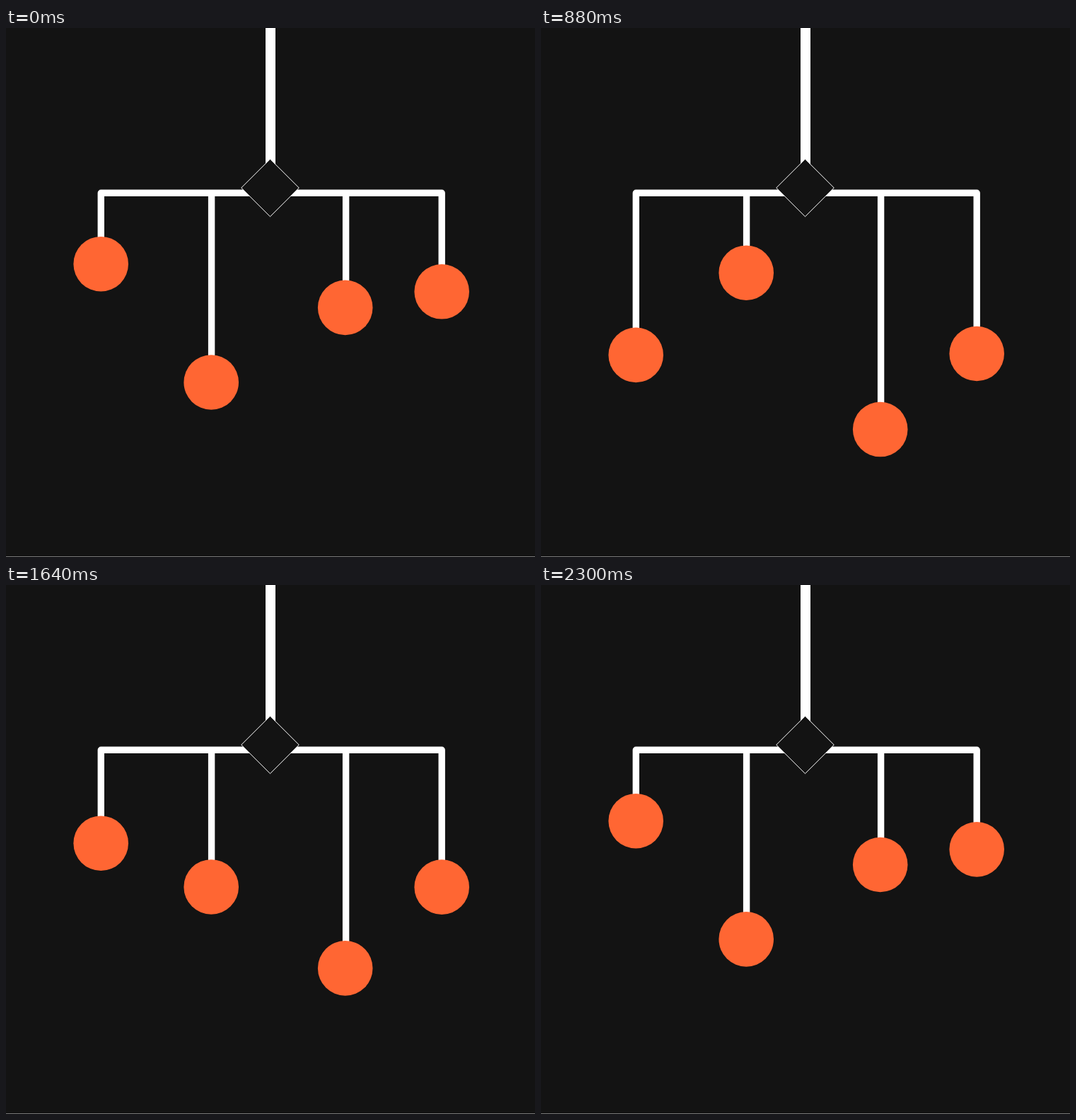
Write an HTML page that moves like this. It is 748x748 px and loops after 2320 ms.

```html
<!DOCTYPE html>
<html lang="en">
<head>
<meta charset="utf-8">
<title>Mobile</title>
<style>
  html, body { margin: 0; width: 100%; height: 100%; overflow: hidden; background: #131313; }
  svg { display: block; width: 100vw; height: 100vh; }
</style>
</head>
<body>
<svg viewBox="0 0 748 748">
  <rect y="747" width="748" height="1" fill="#777"/>
  <g fill="none" stroke="#fff" stroke-width="9.4" stroke-linejoin="round">
    <path d="M374 0V200" stroke-width="14"/>
    <path id="frame"/>
    <path id="rods"/>
  </g>
  <path d="M373.5 185.3L414.3 226L373.5 266.7L332.7 226Z" fill="#131313" stroke="#fff"/>
  <g id="balls" fill="#ff6633"></g>
</svg>
<script>
const LOOP = 2320;
// Each move is [start, duration] in ms.
const balls = [
  { x: 134.2, from: 333.7, to: 462.4, go: [0, 631], back: [1362, 631] },
  { x: 290.2, from: 501, to: 344.7, go: [2, 1010], back: [1357, 985] },
  { x: 479.7, from: 395.4, to: 588.4, go: [395, 808], back: [1507, 822] },
  { x: 616.2, from: 372.8, to: 465, go: [61, 1140], back: [1395, 1055] },
];

const frame = document.getElementById('frame');
const rods = document.getElementById('rods');
const group = document.getElementById('balls');
for (const ball of balls) {
  ball.node = document.createElementNS('http://www.w3.org/2000/svg', 'circle');
  ball.node.setAttribute('cx', ball.x);
  ball.node.setAttribute('r', 38.8);
  group.append(ball.node);
}

// cubic-bezier(.2, 0, .2, 1), solved by bisection
function ease(x) {
  if (x <= 0) return 0;
  if (x >= 1) return 1;
  let low = 0, high = 1, s;
  for (let i = 0; i < 24; i++) {
    s = (low + high) / 2;
    if (0.6 * s * (1 - s) + s ** 3 < x) low = s; else high = s;
  }
  return s * s * (3 - 2 * s);
}

const progress = (t, [start, duration]) => ease((t - start) / duration);

function draw() {
  const t = performance.now() % LOOP;
  const ys = balls.map(({ from, to, go, back, node }) => {
    const y = from + (to - from) * (progress(t, go) - progress(t, back));
    node.setAttribute('cy', y);
    return y;
  });
  frame.setAttribute('d', `M134.3 ${ys[0]}V233.3H616.2V${ys[3]}`);
  rods.setAttribute('d', `M290.6 233V${ys[1]}M480.6 233V${ys[2]}`);
  requestAnimationFrame(draw);
}
draw();
</script>
</body>
</html>
```
